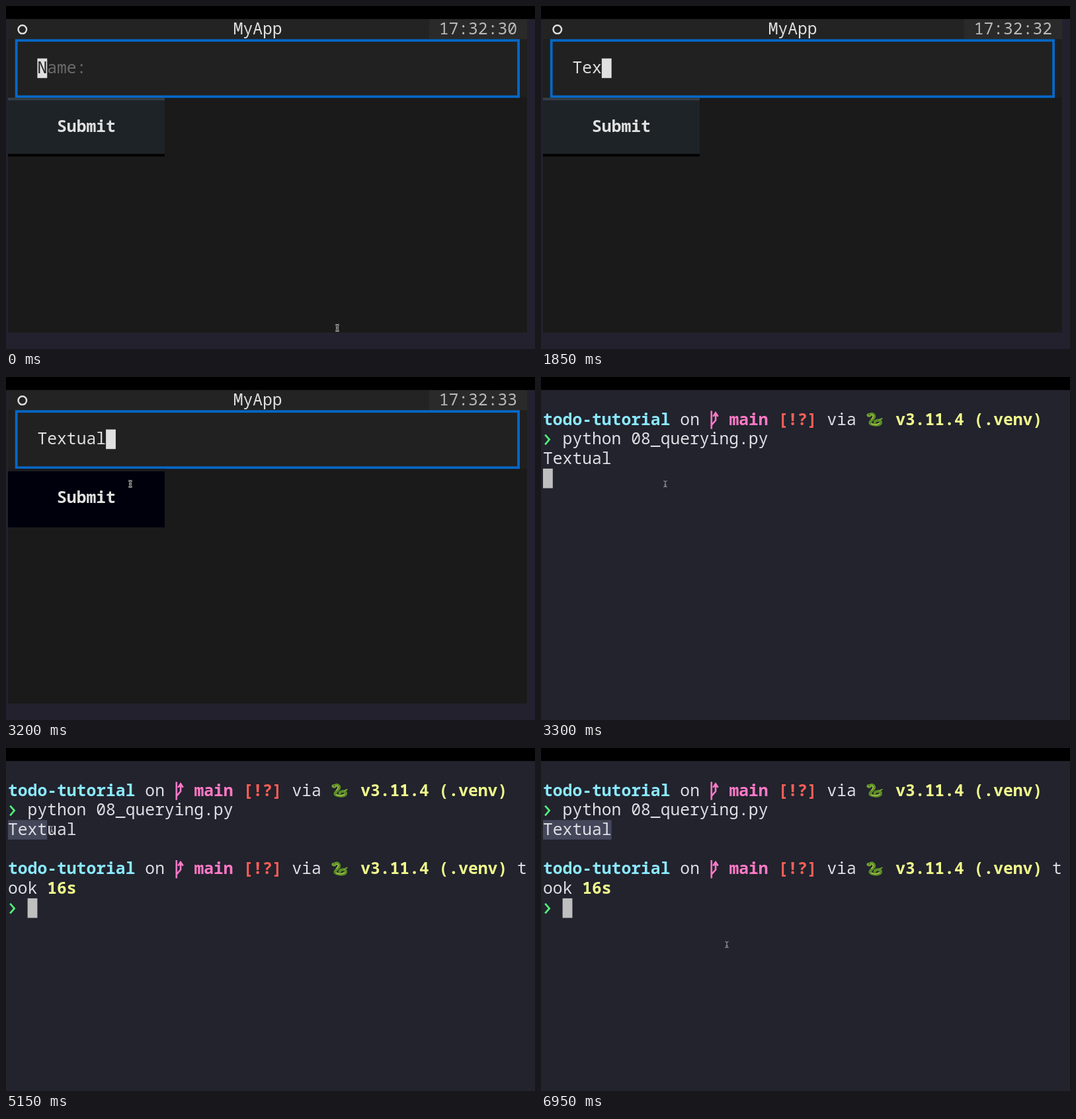
Recreate the animation shown at these times as an HTML page. Size 800x520 px, loop 7000 ms.

```html
<!DOCTYPE html>
<html lang="en">
<head>
<meta charset="utf-8">
<title>Terminal session</title>
<style>
  html, body { margin: 0; width: 100%; height: 100%; overflow: hidden; background: #22232d; }
  svg { display: block; width: 800px; height: 520px; }
  text { font: 24.68px "Noto Sans Mono", "DejaVu Sans Mono", monospace; white-space: pre; }
  .b { font-weight: 700; }
</style>
</head>
<body>
<svg id="stage" viewBox="0 0 800 520"></svg>
<script>
const LOOP = 7000, CW = 14.81, RH = 29.67;
const X = col => 3 + col * CW;
const Y = row => 20.2 + row * RH;
const stage = document.getElementById('stage');

function add(parent, tag, attrs, content = '') {
  const el = document.createElementNS('http://www.w3.org/2000/svg', tag);
  for (const k in attrs) el.setAttribute(k, attrs[k]);
  el.textContent = content;
  parent.appendChild(el);
  return el;
}
const group = (parent, col = 0, row = 0) =>
  add(parent, 'g', col || row ? { transform: `translate(${X(col)} ${Y(row)})` } : {});
const rect = (p, x, y, width, height, fill) => add(p, 'rect', { x, y, width, height, fill });
const text = (p, col, row, s, fill, bold) =>
  add(p, 'text', { x: X(col), y: Y(row) + 22.8, fill, class: bold ? 'b' : '' }, s);
const line = (p, d, stroke, width, extra) =>
  add(p, 'path', { d, stroke, 'stroke-width': width, fill: 'none', ...extra });
const show = (el, on) => el.setAttribute('visibility', on ? 'inherit' : 'hidden');
const round = { 'stroke-linecap': 'round', 'stroke-linejoin': 'round' };

rect(stage, 0, 0, 800, 520, '#22232d');

// Form screen
const app = group(stage);
rect(app, 0, 20, 800, 500, '#22212d');
rect(app, 3, 20, 785, 475, '#1a1a1a');
rect(app, 3, 20, 785, 30.5, '#232323');
rect(app, 640, 20, 148, 30.5, '#2a2a2a');
rect(app, 3, 50.5, 785, 88.5, '#1f1f1f');
add(app, 'circle', { cx: 24.8, cy: 35.6, r: 6.3, fill: 'none', stroke: '#e0e0e0', 'stroke-width': 2.4 });
text(app, 23, 0, 'MyApp', '#dedede');
const clock = text(app, 44, 0, '', '#b8b8b8');
add(app, 'rect', { x: 15.7, y: 52.2, width: 759.4, height: 85.2, fill: '#212121', stroke: '#0568c8', 'stroke-width': 3.8 });
const hint = text(app, 3, 2, 'Name:', '#6a6a6a');
const typed = text(app, 3, 2, '', '#dedede');
const caret = rect(app, 0, Y(2), CW, RH, '#e0e0e0');
const caretChar = text(app, 3, 2, 'N', '#212121');

const face = rect(app, 3, 139, 237, 89, '#1e2327');
const edge = rect(app, 3, 139, 237, 4, '#333e47');
const base = rect(app, 3, 224.3, 237, 3.9, '#000');
text(app, 5, 5, 'Submit', '#e0e0e0', true);

// Shell screen
const shell = group(stage);
const mark = rect(shell, 3, Y(3), 0, RH, '#44475a');

function prompt(parent, row) {
  text(parent, 0, row, 'todo-tutorial', '#8be9fd', true);
  text(parent, 14, row, 'on', '#dedfe3');
  line(group(parent, 17, row), 'M3 1.5V29M3 23L9.3 16V6M5.5 10L9.3 4.5L13 10', '#ff79c6', 2.6);
  text(parent, 19, row, 'main', '#ff79c6', true);
  text(parent, 24, row, '[!?]', '#ff5f57', true);
  text(parent, 29, row, 'via', '#dedfe3');
  snake(group(parent, 33, row));
  text(parent, 36, row, 'v3.11.4 (.venv)', '#f1fa8c', true);
}
function snake(g) {
  line(g, 'M4 8C10 3 15 9 11 13C7 17 3 20 9 22C15 24 23 23 22 18C21 14 13 16 13 19', '#5b8f25', 4.2, round);
  line(g, 'M5 8C11 6 12 10 8 14M8 21Q14 24 20 20', '#b5c650', 1.4, round);
  line(g, 'M20 15L24 13', '#78a832', 1.8, round);
  add(g, 'ellipse', { cx: 4.5, cy: 8, rx: 3.7, ry: 2.8, fill: '#72a52f' });
  add(g, 'circle', { cx: 4.7, cy: 7, r: .8, fill: '#171a12' });
}
const chevron = (p, row) => line(group(p, 0, row), 'M3.2 8L9.6 15.3L3.2 22.8', '#50fa7b', 2.7);

prompt(shell, 1);
chevron(shell, 2);
text(shell, 2, 2, 'python 08_querying.py', '#dedfe3');
text(shell, 0, 3, 'Textual', '#dedfe3');
const done = group(shell);
prompt(done, 5);
text(done, 52, 5, 't', '#dedfe3');
text(done, 0, 6, 'ook', '#dedfe3');
text(done, 4, 6, '16s', '#f1fa8c', true);
chevron(done, 7);
const block = rect(shell, 0, 0, CW, RH, '#bfbfbf');

rect(stage, 0, 0, 800, 19.7, '#000');

// Mouse pointer: outlined over the form, thin over the shell
const mouse = group(stage);
const beam = 'M-2.7 -4.5Q0 -4.5 0 -2.5Q0 -4.5 2.7 -4.5M0 -3V3M-2.7 4.5Q0 4.5 0 2.5Q0 4.5 2.7 4.5';
const outlined = group(mouse);
line(outlined, beam + 'M-2 0H2', '#d8d8d8', 2.6);
line(outlined, beam + 'M-1.4 0H1.4', '#222', 1);
const thin = line(mouse, beam + 'M-1.5 1.5H1.5', '#9b9ba2', 1.1);

const WORD = 'Textual';
const KEYS = [1450, 1650, 1850, 1950, 2000, 2100, 2150];
const TICKS = [550, 1550, 2550];
const BLINKS = [100, 600, 1100];
const SHELL_AT = 3300, PROMPT_AT = 3450, DRAG_AT = 4850;
const PATH = [
  [0, 501, 488], [350, 410, 270], [700, 318, 100], [950, 308, 91], [2500, 308, 91],
  [2800, 211, 151], [3200, 188, 162], [3750, 188, 162], [4050, 73, 136],
  [4500, 9, 124], [4600, 9, 123], [4850, 9, 123], [5150, 69, 123], [5450, 112, 123],
  [5600, 112, 123], [6200, 235, 215], [6300, 235, 215], [6500, 281, 298], [LOOP, 281, 298]
];
const passed = (times, t) => times.filter(at => t >= at).length;

function pointAt(t) {
  const i = PATH.findIndex(p => p[0] > t);
  const [t0, x0, y0] = PATH[i - 1], [t1, x1, y1] = PATH[i];
  const k = (t - t0) / (t1 - t0);
  return [x0 + (x1 - x0) * k, y0 + (y1 - y0) * k];
}

function render(t) {
  const inShell = t >= SHELL_AT;
  const [mx, my] = pointAt(t);
  show(app, !inShell);
  show(shell, inShell);

  const n = passed(KEYS, t);
  const lit = n > 0 || passed(BLINKS, t) % 2 === 0;
  clock.textContent = '17:32:' + (30 + passed(TICKS, t));
  typed.textContent = WORD.slice(0, n);
  show(hint, !n);
  caret.setAttribute('x', X(3 + n));
  show(caret, lit);
  show(caretChar, lit && !n);

  const hover = mx < 240 && my > 139 && my < 228;
  face.setAttribute('fill', hover ? '#00000d' : '#1e2327');
  edge.setAttribute('fill', hover ? '#1b1c1f' : '#333e47');
  show(base, !hover);

  const ready = t >= PROMPT_AT;
  show(done, ready);
  block.setAttribute('x', X(ready ? 2 : 0));
  block.setAttribute('y', Y(ready ? 7 : 4));
  const cells = t < DRAG_AT ? 0 : Math.min(WORD.length, Math.round((mx - 3) / CW));
  mark.setAttribute('width', cells * CW);

  mouse.setAttribute('transform', `translate(${mx} ${my})`);
  show(mouse, t < KEYS[0] || t >= 2550);
  show(outlined, !inShell);
  show(thin, inShell);
}

const start = performance.now();
function frame() {
  const t = (performance.now() - start) % LOOP;
  render(Math.floor(t / 50) * 50);
  requestAnimationFrame(frame);
}
frame();
</script>
</body>
</html>
```
